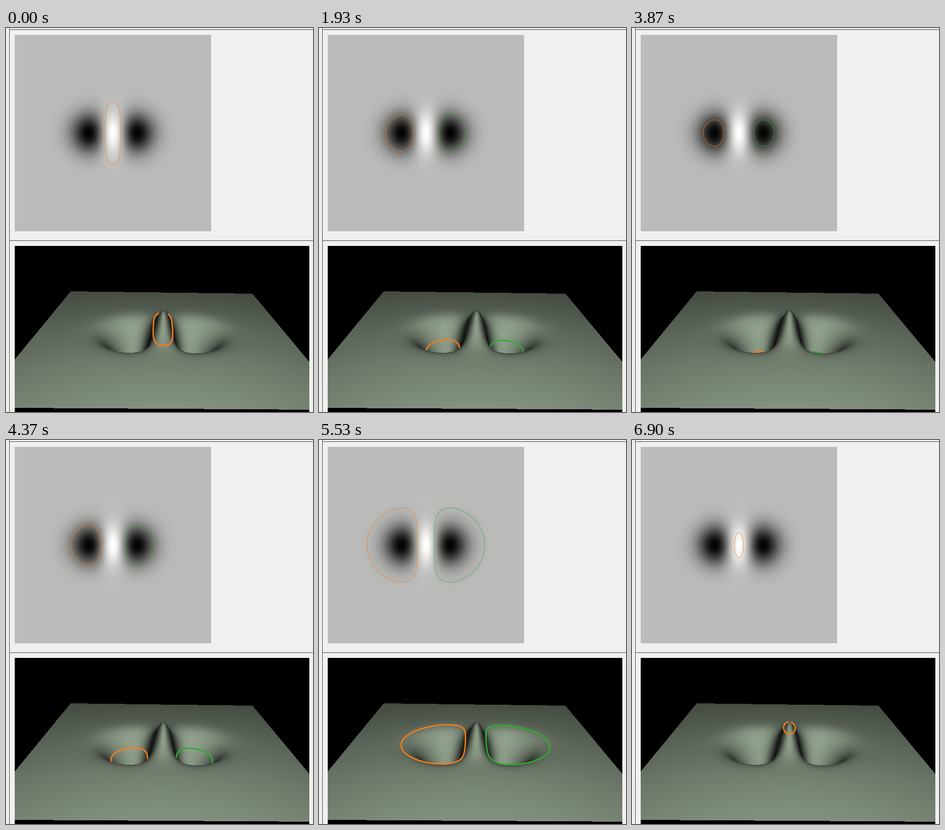
Write an HTML page with a canvas that moves like this. It is 669 px wide and 837 px high and loops after 7860 ms.

```html
<!DOCTYPE html>
<html lang="en">
<head>
<meta charset="utf-8">
<title>Level sets of a surface</title>
<style>
  html, body { margin: 0; width: 100%; height: 100%; overflow: hidden; background: #f0f0ee; }
  canvas, svg { position: absolute; left: 0; top: 0; display: block; }
  path { fill: none; stroke-linejoin: round; }
  .flat { stroke-width: 1.15; stroke-opacity: .72; }
  .deep { stroke-width: 3.1; }
  .a { stroke: #f07c1c; }
  .b { stroke: #32aa32; }
</style>
</head>
<body>
<canvas id="stage" width="669" height="837"></canvas>
<svg width="669" height="837" viewBox="0 0 669 837">
  <path class="flat a"/><path class="flat b"/>
  <path class="deep a"/><path class="deep b"/>
</svg>
<script>
const LOOP = 7860, SIZE = 428, HALF = SIZE / 2;
const MAP = { x: 19, y: 15 }, VIEW = { x: 19, y: 475, w: 642, h: 362 };

// Field over u, v in [-1, 1]: (1 - C u^2) exp(-A u^2 - B v^2)
const C = 151.1, A = 18.3, B = 25.2, H = 0.17;
const field = (u, v) => (1 - C * u * u) * Math.exp(-A * u * u - B * v * v);
const ZERO = 1 / Math.sqrt(C), PIT = Math.sqrt(1 / C + 1 / A);

// Projective camera: each row gives the constant, u, v and z factors
const PX = [341.55, 268.85, -116.1, -57.4];
const PY = [659.4, 7.27, -116.6, -373.4];
const PW = [1, 0.0068, -0.346, -0.2];
const LIGHT = [0, 1.69, 1.51], TINT = [144, 160, 140];

const dot = (p, u, v, z) => p[0] + p[1] * u + p[2] * v + p[3] * z;

function project(u, v, z) {
  const w = dot(PW, u, v, z);
  return [dot(PX, u, v, z) / w, dot(PY, u, v, z) / w];
}

// Line of sight through a pixel: u = u0 + u1 z, v = v0 + v1 z
function sight(x, y) {
  const r = PX.map((k, i) => k - x * PW[i]);
  const s = PY.map((k, i) => k - y * PW[i]);
  const det = r[1] * s[2] - r[2] * s[1];
  const solve = i => [(r[2] * s[i] - r[i] * s[2]) / det, (r[i] * s[1] - r[1] * s[i]) / det];
  const [u0, v0] = solve(0), [u1, v1] = solve(3);
  return { u0, v0, u1, v1 };
}

function visible(x, y, z) {
  const { u0, v0, u1, v1 } = sight(x, y);
  for (let h = z + 0.006; h < 0.175; h += 0.006) {
    if (H * field(u0 + u1 * h, v0 + v1 * h) > h) return false;
  }
  return true;
}

function shade(u, v, z) {
  const e = H * Math.exp(-A * u * u - B * v * v);
  const nu = 2 * u * e * (C + A * (1 - C * u * u)), nv = 2 * B * v * z;
  const lu = LIGHT[0] - u, lv = LIGHT[1] - v, lz = LIGHT[2] - z;
  const cos = (nu * lu + nv * lv + lz) / (Math.hypot(nu, nv, 1) * Math.hypot(lu, lv, lz));
  return Math.max(0, cos);
}

function surface(x, y) {
  const { u0, v0, u1, v1 } = sight(x, y);
  if (v0 < -1.02) return 0;
  const above = z => z > H * field(u0 + u1 * z, v0 + v1 * z);
  let hi = 0.175, lo = hi;
  while (above(lo)) { hi = lo; lo -= 0.009; }
  for (let i = 0; i < 9; i++) {
    const mid = (hi + lo) / 2;
    if (above(mid)) hi = mid; else lo = mid;
  }
  const u = u0 + u1 * lo, v = v0 + v1 * lo;
  return Math.abs(u) > 1 || Math.abs(v) > 1 ? 0 : shade(u, v, lo);
}

function paint(ctx, x, y, w, h, color) {
  const img = ctx.createImageData(w, h);
  for (let j = 0, k = 0; j < h; j++) {
    for (let i = 0; i < w; i++, k += 4) {
      const c = color(i + 0.5, j + 0.5);
      for (let n = 0; n < 3; n++) img.data[k + n] = c[n];
      img.data[k + 3] = 255;
    }
  }
  ctx.putImageData(img, x, y);
}

function drawStill() {
  const ctx = document.getElementById('stage').getContext('2d');
  ctx.fillStyle = '#f0f0ee';
  ctx.fillRect(0, 0, 669, 837);
  ctx.fillStyle = '#333';
  ctx.fillRect(7, 0, 1, 837);
  ctx.fillRect(7, 3, 662, 1);
  ctx.fillRect(7, 463, 662, 1);
  paint(ctx, MAP.x, MAP.y, SIZE, SIZE, (i, j) => {
    const g = Math.round(186 + 69 * field(i / HALF - 1, j / HALF - 1));
    return [g + 1, g + 1, g - 1];
  });
  paint(ctx, VIEW.x, VIEW.y, VIEW.w, VIEW.h, (i, j) => {
    const s = surface(VIEW.x + i, VIEW.y + j);
    return TINT.map(t => t * s);
  });
}

// Where the profile at v = 0 crosses a level, between inside and outside
function root(level, inside, outside) {
  for (let i = 0; i < 40; i++) {
    const mid = (inside + outside) / 2;
    if (field(mid, 0) / level > 1) inside = mid; else outside = mid;
  }
  return inside;
}

function ring(level, from, to) {
  const pts = [], count = 180;
  for (let i = 0; i <= count; i++) {
    const a = i / count * 2 * Math.PI;
    const u = (from + to) / 2 + (to - from) / 2 * Math.cos(a);
    const v = Math.sqrt(Math.max(0, Math.log(field(u, 0) / level)) / B);
    pts.push([u, a < Math.PI ? -v : v]);
  }
  return pts;
}

function contours(level) {
  if (level > 0) {
    const r = root(level, 0, ZERO);
    return [ring(level, -r, r), []];
  }
  let right;
  if (level < 0) right = ring(level, root(level, PIT, ZERO), root(level, PIT, 1));
  else right = Array.from({ length: 181 }, (_, i) => [ZERO, i / 90 - 1]);
  return [right.map(([u, v]) => [-u, v]), right];
}

function trace(pts) {
  let d = '', pen = false;
  for (const p of pts) {
    if (p) d += (pen ? 'L' : 'M') + p[0].toFixed(2) + ' ' + p[1].toFixed(2);
    pen = !!p;
  }
  return d;
}

const onMap = ([u, v]) => [MAP.x + HALF * (1 + u), MAP.y + HALF * (1 + v)];

function onView([u, v], level) {
  const z = level * H + 0.016;
  const p = project(u, v, z);
  return visible(p[0], p[1], z) ? p : null;
}

// Level drags: first change, last change, number of changes, value reached
const DRAGS = [
  [530, 530, 1, 3], [830, 830, 1, 4], [970, 1230, 5, -12], [1300, 1730, 10, -26],
  [1800, 1930, 4, -31], [2270, 2570, 8, -48], [2770, 2900, 4, -52],
  [3730, 4370, 14, -26], [4400, 4500, 3, -23], [4530, 4930, 9, -10],
  [5070, 5230, 4, -6], [5400, 5570, 3, 0], [5650, 6100, 6, 7], [6170, 6170, 1, 10],
  [6230, 6430, 4, 15], [6630, 6700, 2, 17], [6900, 6900, 1, 18]
];

function levelAt(t) {
  let value = 2;
  for (const [start, end, steps, goal] of DRAGS) {
    if (t < start) break;
    const done = t >= end ? steps : 1 + Math.floor((t - start) / (end - start) * (steps - 1));
    value = Math.round(value + (goal - value) * done / steps);
  }
  return value / 27;
}

const paths = [...document.querySelectorAll('path')];
let shown = null;

function update(t) {
  const level = levelAt(t);
  if (level === shown) return;
  shown = level;
  contours(level).forEach((pts, i) => {
    paths[i].setAttribute('d', trace(pts.map(onMap)));
    paths[i + 2].setAttribute('d', trace(pts.map(p => onView(p, level))));
  });
}

drawStill();
update(0);
let begin = null;
function tick(now) {
  if (begin === null) begin = now;
  update((now - begin) % LOOP);
  requestAnimationFrame(tick);
}
requestAnimationFrame(tick);
</script>
</body>
</html>
```
